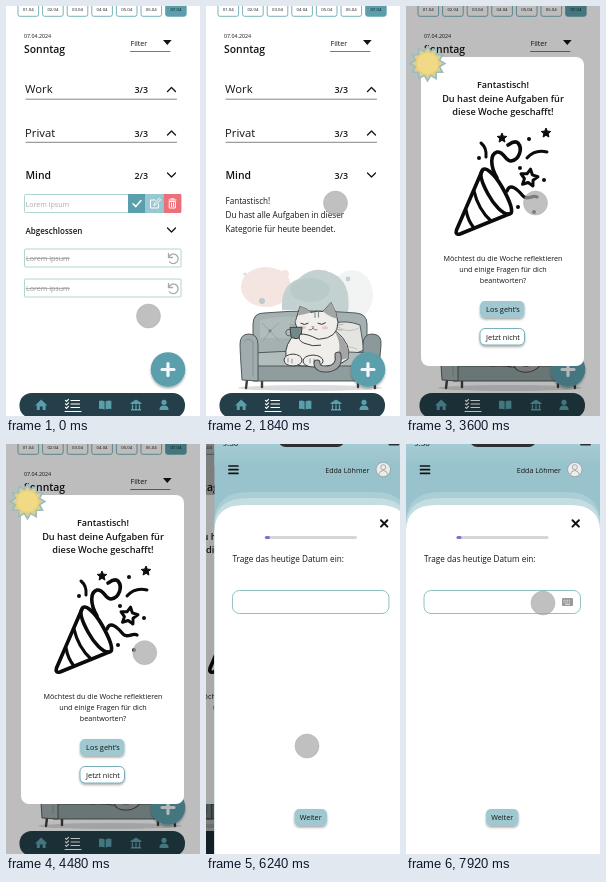
These frames come from a looping animation (194x410 px, 8 s). An HTML page:

```html
<!DOCTYPE html>
<html lang="de">
<head>
<meta charset="utf-8">
<style>
  html, body { margin: 0; width: 100%; height: 100%; overflow: hidden; background: #fff; }
  svg { display: block; width: 194px; height: 410px; }
  text { font-family: "Open Sans", "Noto Sans", sans-serif; white-space: pre; }
</style>
</head>
<body>
<svg id="stage" viewBox="0 0 194 410" xmlns="http://www.w3.org/2000/svg"></svg>
<script>
const LOOP = 8000;
const TEAL = '#5a9fab', PALE = '#9fc8d0', NAVY = '#243f49', INK = '#141414';

// ---- drawing helpers ----
const text = (x, y, size, str, extra = '') =>
  `<text x="${x}" y="${y}" font-size="${size}" fill="${INK}" ${extra}>${str}</text>`;
const bold = (x, y, size, str, extra = '') => text(x, y, size, str, 'font-weight="600" ' + extra);
const mid = (y, size, str, extra = '') => text(97, y, size, str, 'text-anchor="middle" ' + extra);
const rect = (x, y, w, h, r, fill, extra = '') =>
  `<rect x="${x}" y="${y}" width="${w}" height="${h}" rx="${r}" fill="${fill}" ${extra}/>`;
const line = (d, color = INK, w = 1, extra = '') =>
  `<path d="${d}" fill="none" stroke="${color}" stroke-width="${w}" stroke-linecap="round" stroke-linejoin="round" ${extra}/>`;
const shape = (d, fill, extra = '') => `<path d="${d}" fill="${fill}" stroke-linejoin="round" ${extra}/>`;
const dot = (x, y, r, fill, extra = '') => `<circle cx="${x}" cy="${y}" r="${r}" fill="${fill}" ${extra}/>`;
const oval = (x, y, rx, ry, fill, extra = '') =>
  `<ellipse cx="${x}" cy="${y}" rx="${rx}" ry="${ry}" fill="${fill}" ${extra}/>`;
const group = (id, body, extra = '') => `<g id="${id}" ${extra}>${body}</g>`;
const chevron = (y, up) => line(`M161.5 ${y + (up ? 2 : -2)}l4 ${up ? -4 : 4}l4 ${up ? 4 : -4}`, INK, 1.3);

function star(cx, cy, outer, inner, points, turn = -90) {
  let d = '';
  for (let i = 0; i < points * 2; i++) {
    const a = (turn + i * 180 / points) * Math.PI / 180, r = i % 2 ? inner : outer;
    d += `${i ? 'L' : 'M'}${(cx + r * Math.cos(a)).toFixed(2)} ${(cy + r * Math.sin(a)).toFixed(2)}`;
  }
  return d + 'Z';
}

// ---- task page ----
function days() {
  let s = '';
  for (let i = 0; i < 7; i++) {
    const x = 22.3 + i * 24.6, last = i === 6;
    s += rect(x - 10.3, -10, 20.6, 20.3, 2, last ? TEAL : '#fff', `stroke="${TEAL}" stroke-width=".8"`) +
      text(x, 4.6, 4.3, `0${i + 1}.04`, 'text-anchor="middle"');
  }
  return s;
}

function frame() {
  return rect(0, 0, 194, 410, 0, '#fff') + days() +
    text(18, 31.5, 5.3, '07.04.2024') + bold(18, 46.5, 10.4, 'Sonntag') +
    text(124.5, 39.5, 7.1, 'Filter') + shape('M157 34h8.6l-4.3 5z', INK) +
    line('M124.5 45.5H164', '#555', .8) +
    text(19, 87, 11.3, 'Work') + bold(128.5, 86.5, 8.8, '3/3') + chevron(83.5, true) +
    line('M20 93.2H170.5', '#666', .8) +
    text(19, 131, 11.3, 'Privat') + bold(128.5, 130.5, 8.8, '3/3') + chevron(127, true) +
    line('M20 136.3H170.5', '#666', .8) +
    bold(19.5, 173, 10.4, 'Mind') + chevron(169, false);
}

const undo = y => line(`M162.5 ${y - 4.5}v4h4M162.8 ${y - .8}a4.8 4.8 0 1 1 .8 4.6`, '#aaa', 1.3);
const doneRow = y =>
  rect(18.5, y, 156.5, 18, 1, '#fff', 'stroke="#a5d3cf" stroke-width=".9"') +
  text(20, y + 11.8, 7.1, 'Lorem ipsum', 'style="fill:#999"') +
  line(`M20 ${y + 9.5}H63.5`, '#888', .6) + undo(y + 9);

function tasks() {
  return bold(128.5, 172.5, 8.8, '2/3') +
    rect(18.5, 188.5, 156.5, 18, 1, '#fff', 'stroke="#a5d3cf" stroke-width=".9"') +
    text(19.5, 200.5, 7.1, 'Lorem ipsum', 'style="fill:#aaa"') +
    rect(122, 188, 17.6, 19, 0, TEAL) + rect(139.6, 188, 17.8, 19, 0, '#98c8d1') +
    rect(157.4, 188, 17.8, 19, 1, '#ee6f78') +
    line('M127 197.8l2.8 2.8l5.2-6', '#fff', 1.5) +
    line('M149 194h-4.5v8h8v-4M148 199l.5-2l4.8-4.6l1.4 1.4l-4.7 4.7z', '#fff', 1) +
    line('M163 194h7M165 192.8h3M163.6 195.5h5.8v6.5h-5.8zM165.6 197v3.6M167.5 197v3.6', '#fff', 1) +
    bold(19.5, 227.5, 8, 'Abgeschlossen') + chevron(224, false) +
    doneRow(243) + doneRow(273);
}

function sofa() {
  const edge = 'stroke="#454f51" stroke-width=".9"';
  return oval(60, 281, 25, 20, '#f4e5e1') + dot(79, 268, 4, '#f4e5e1') +
    oval(146, 289, 21, 25, '#f2f4f4') +
    shape('M76 304Q74 280 92 273Q108 258 126 267Q146 276 142 306Z', '#c3d1d0') +
    oval(104, 284, 20, 12, '#b4c6c5', 'opacity=".6"') +
    dot(56, 295, 3, '#bccaca') + dot(142, 273, 2.4, '#c3d1d0') + dot(39, 268, 1.6, '#d3dcde') +
    oval(104, 382, 72, 3, '#d9dddd') +
    line('M41 374l-1 8M56 375v6M152 375v6M168 374l1 8', '#4a3d35', 2.4) +
    shape('M47 356V318Q47 307 58 307Q104 303 150 307Q161 308 161 318V356Z', '#a5b1b1', edge) +
    shape('M54 314Q78 308 96 312V332H54Z', '#b6c0bf', 'opacity=".7"') +
    dot(64, 325, 1.4, '#59676a') + dot(148, 322, 1.4, '#59676a') +
    line('M64 325l-8-8M64 325l9-8M64 325l-7 10M64 325l9 10', '#87959a', .6) +
    shape('M123 349L129 317Q141 314 154 319L158 344Q142 352 123 349Z', '#e4e4e0', edge) +
    line('M132 321Q142 328 153 322M130 344Q140 338 151 343', '#a9aaa8', .6) +
    shape('M47 347Q104 343 162 347V361H47Z', '#b2bcbb', edge) +
    shape('M47 360H162V375H47Z', '#8f9d9e', edge) +
    shape('M36 374Q34 345 34 338Q34 328 43 328Q52 328 52 339V375Z', '#a0acad', edge) +
    shape('M157 375V339Q157 328 166 328Q176 328 175 339L172 374Z', '#8c999b', edge) +
    line('M39 335Q43 331 47 336V369', '#78878a', .7);
}

function cat() {
  const edge = 'stroke="#3d3d3f" stroke-width="1"', cream = '#efeeeb', grey = '#a3a5a6';
  const head = shape('M89 316L94 300Q101 302 105 306Q111 304 117 305L125 296Q131 306 132 316Q132 332 113 333Q92 333 89 316Z', cream, edge) +
    shape('M117 305L125 296Q130 304 131 312Q124 311 117 305Z', grey) +
    shape('M94 300Q101 302 105 306Q98 308 92 309Z', grey) +
    line('M109 306v5M112.5 305.5v5', '#85888a', 1.1) +
    line('M95 317q3.5 2.5 7 0M112 317q4 2.5 7.5-.5', '#333', 1) +
    shape('M105 320h4l-2 2z', '#c98a86') +
    line('M107 322q-1 2.5-4 1.5M107 322q1 2.5 4 1.5', '#444', .7) +
    oval(97, 321, 3, 1.7, '#e8c9c3') + oval(119, 321.5, 3, 1.7, '#e8c9c3') +
    line('M89 319l-5-1M90 322l-5 1M131 319l6-1M130 323l6 1', '#777', .5);
  const tail = 'M132 349Q134 361 122 363Q111 364 111 357';
  return shape('M80 351Q78 338 90 327Q110 316 130 325Q146 338 142 353Q132 362 105 360Q83 361 80 351Z', cream, edge) +
    shape('M128 324Q145 338 142 352Q136 355 131 352Q137 339 128 324Z', grey) +
    oval(87, 354, 9, 6, cream, edge) + oval(107, 355, 10, 6, cream, edge) +
    line('M82 352v4M86 353v4M104 353v4M108 353v4', '#555', .6) +
    line(tail, '#44484a', 7) + line(tail, grey, 5) +
    group('head', head) +
    line('M86 316q-2-3 0-5M90 316q-2-3 0-5', '#aaa', .6) +
    shape('M84 321H96L95 331Q90 334 85 331Z', '#71898b', edge) + line('M84 323q-5 0-4 4t5 2', '#4e5d60', 1) +
    shape('M112 333Q101 327 94 328Q91 334 98 337Q107 341 115 339', cream, edge);
}

function praise() {
  return bold(128.5, 172.5, 8.8, '3/3') +
    text(19.5, 198, 8.1, 'Fantastisch!') +
    text(19.5, 212, 8.2, 'Du hast alle Aufgaben in dieser') +
    text(19.5, 225.5, 8.2, 'Kategorie für heute beendet.') +
    sofa() + group('cat', cat());
}

function nav() {
  return dot(162, 363.5, 17.3, TEAL, 'filter="url(#soft)"') +
    line('M162 357.5v12M156 363.5h12', '#f1f8f9', 3.2) +
    rect(13.5, 387, 165.5, 25, 12, NAVY) +
    shape('M29 399.5l6.2-6l6.2 6h-1.8v4.5h-3v-3.5h-2.8v3.5h-3v-4.5z', TEAL) +
    line('M65 394.5h8.5M65 398h8.5M65 401.5h8.5M59.5 394.3l1 1l2-2M59.5 397.8l1 1l2-2M59.5 401.3l1 1l2-2', '#fff', 1.2) +
    line('M59 405.5H75', '#fff', 1) +
    shape('M93 395q3-1 5.6.5v8q-3-1-5.6-.5zM99.6 395.5q3-1.5 5.8-.5v8q-3-.5-5.8.5z', TEAL) +
    shape('M124.5 397l5.5-3.5l5.5 3.5v1h-11zM125 403h10v1.4h-10z', TEAL) +
    line('M126.5 399v3.5M130 399v3.5M133.5 399v3.5', TEAL, 1.3) +
    dot(158, 396.3, 2.6, TEAL) + shape('M153.4 404q0-4.4 4.6-4.4t4.6 4.4z', TEAL);
}

// ---- dialog ----
function popper() {
  const pen = (d, w = 3.6) => line(d, '#0b0b0b', w);
  return pen('M76 165L50.5 224Q49 229 54 228L103 208') +
    pen('M76 165C78 159 88 167 96 181C104 195 109 208 103 208C97 209 88 199 82 188C76 177 73 169 76 165Z') +
    pen('M68 185Q72 203 85 215M60 204Q62 215 68 222', 3.2) +
    pen('M91 172C84 160 84 148 91 146C98 145 99 155 105 155C113 154 117 143 112 137C109 134 105 137 102 139') +
    pen('M101 185C104 176 112 184 117 190C121 195 127 188 131 191', 3.4) +
    pen('M121 152Q129 143 141 146M75 137Q81 142 80 151', 3) +
    shape(star(96, 132, 5, 2.3, 5), '#0b0b0b', 'stroke="#0b0b0b" stroke-width="1"') +
    shape(star(140, 127, 5, 2.3, 5), '#0b0b0b', 'stroke="#0b0b0b" stroke-width="1"') +
    shape(star(123, 172, 9, 4.6, 5, -80), '#fff', 'stroke="#0b0b0b" stroke-width="3"') +
    [[123, 133], [73, 152], [114, 162], [138, 174], [128, 206], [112, 201]]
      .map(p => dot(p[0], p[1], 2, '#0b0b0b')).join('');
}

const sunShape = (rim, fill, core) =>
  shape(star(0, 0, 19, 13.5, 12), rim) + shape(star(0, 0, 15.5, 11.5, 12), fill) + dot(0, 0, 10.5, core);

function dialog() {
  return rect(0, 0, 194, 410, 0, '#000', 'opacity=".26"') +
    rect(15, 51, 163, 309, 8, '#fff') +
    mid(82, 9, 'Fantastisch!', 'font-weight="600"') +
    mid(95.5, 9.2, 'Du hast deine Aufgaben für', 'font-weight="600"') +
    mid(109, 9.2, 'diese Woche geschafft!', 'font-weight="600"') + popper() +
    mid(255, 7.2, 'Möchtest du die Woche reflektieren') +
    mid(266, 7.2, 'und einige Fragen für dich') + mid(277, 7.2, 'beantworten?') +
    rect(74, 295, 44.5, 17, 5, PALE, 'filter="url(#soft)"') + mid(306, 7.4, 'Los geht’s') +
    rect(74, 322.5, 44.5, 16.5, 5, '#fff', `stroke="${TEAL}" stroke-width=".8" filter="url(#soft)"`) +
    mid(333.5, 7.4, 'Jetzt nicht') +
    group('sun', group('sunPale', sunShape('#9bbcc0', '#e5cf83', '#f0da86')) +
      group('sunFull', sunShape('#4f97a5', '#fbc53a', '#fdc52f')));
}

// ---- question page ----
function question() {
  return rect(0, 0, 194, 410, 0, '#98c3cc') + rect(0, 0, 194, 22, 0, 'url(#sky)') +
    text(8, 2, 8, '9:30') + rect(63.5, -14, 67, 17, 8, '#2c2f31') + rect(174, -4, 11, 5.5, 1.5, '#2c2f31') +
    line('M14.5 22h9M14.5 25.7h9M14.5 29.4h9', INK, 1.7) +
    text(155, 28.5, 7.1, 'Edda Löhmer', 'text-anchor="end"') +
    dot(168.8, 25.5, 7.2, '#ececec', 'stroke="#888" stroke-width=".6"') +
    dot(168.8, 23.2, 2.5, 'none', 'stroke="#999" stroke-width=".8"') +
    line('M164.5 30q.5-3.5 4.3-3.5t4.3 3.5', '#999', .8) +
    shape('M0 73Q4 48 34 48H160Q190 48 194 73V410H0Z', '#a9ced6') +
    shape('M0 78Q3 54 34 54H160Q191 54 194 78V410H0Z', '#c3dde2') +
    shape('M0 86Q1 61 30 61H164Q193 61 194 86V410H0Z', '#fff') +
    line('M166.5 76.2l6.4 6.4M172.9 76.2l-6.4 6.4', INK, 2) +
    rect(50.5, 92, 92, 3, 1.5, '#d5d5da') + rect(50.5, 92, 5, 3, 1.5, '#7a72cf') +
    text(18, 118, 8.2, 'Trage das heutige Datum ein:') +
    rect(18, 146.5, 156.5, 23, 7, '#fff', 'stroke="#74b0b0" stroke-width=".8"') +
    group('keys', rect(156, 154, 11, 8, 1, '#999') +
      line('M158 156.3h7M158 158.2h7', '#fff', .9, 'stroke-dasharray=".1 1.7"') + line('M159.5 160.3h4', '#fff', .8)) +
    rect(80, 365, 32.5, 17, 5, PALE, 'filter="url(#soft)"') +
    text(96.2, 376, 7.2, 'Weiter', 'text-anchor="middle"');
}

const stage = document.getElementById('stage');
stage.innerHTML = `<defs>
  <filter id="soft" x="-30%" y="-30%" width="160%" height="180%"><feDropShadow dx="0" dy="1.5" stdDeviation="1.2" flood-opacity=".35"/></filter>
  <linearGradient id="sky" x2="0" y2="1"><stop stop-color="#a5cbd3"/><stop offset="1" stop-color="#98c3cc"/></linearGradient>
  </defs>` +
  group('home', frame() + group('tasks', tasks()) + group('praise', praise()) + nav() + group('dialog', dialog())) +
  group('shade', rect(0, 0, 194, 410, 0, '#000')) +
  group('question', question()) +
  group('touch', dot(0, 0, 12, '#a9a9a9', 'opacity=".72" stroke="#8c8c8c" stroke-width=".5"'));

// ---- motion ----
const el = {};
for (const g of stage.querySelectorAll('g[id]')) el[g.id] = g;

const ramp = (t, a, b) => Math.min(1, Math.max(0, (t - a) / (b - a)));
const smooth = p => p * p * (3 - 2 * p);
const outQuart = p => 1 - (1 - p) ** 4;
const fade = (g, v) => {
  g.setAttribute('opacity', v.toFixed(3));
  g.setAttribute('display', v > 0 ? 'inline' : 'none');
};
const place = (g, v) => g.setAttribute('transform', v);

// start, end, from, bend, to
const moves = [
  [0, 900, [142.5, 310], [146, 240], [129.5, 197]],
  [4260, 5160, [129.5, 197], [168, 233], [101, 302]],
  [6800, 7600, [101, 302], [112, 215], [137, 159]]
];
const taps = [1160, 5560, 7780];

function pointer(t) {
  let [x, y] = moves[0][2];
  for (const [a, b, p, q, r] of moves) {
    if (t < a) break;
    const k = smooth(ramp(t, a, b)), m = 1 - k;
    [x, y] = [0, 1].map(i => m * m * p[i] + 2 * m * k * q[i] + k * k * r[i]);
  }
  return [x, y];
}

function draw(t) {
  const [x, y] = pointer(t);
  const press = Math.max(...taps.map(c => 1 - Math.min(1, Math.abs(t - c) / 130)));
  place(el.touch, `translate(${x.toFixed(2)} ${y.toFixed(2)}) scale(${(1 - .12 * smooth(press)).toFixed(3)})`);

  const done = smooth(ramp(t, 1460, 1760));
  fade(el.tasks, 1 - done);
  fade(el.praise, done);

  // the cat nods while it breathes
  const breath = Math.sin((t - 2520) / 2720 * 2 * Math.PI);
  place(el.cat, `translate(0 360) scale(1 ${(1 + .008 * breath).toFixed(4)}) translate(0 -360)`);
  place(el.head, `translate(${(-1.5 - 1.5 * breath).toFixed(2)} ${(-1 - breath).toFixed(2)})`);

  fade(el.dialog, smooth(ramp(t, 3200, 3560)));
  const glow = smooth(ramp(t, 4560, 5040));
  place(el.sun, `translate(${21.5 - 2 * glow} 57.5) rotate(${(15 * glow).toFixed(2)})`);
  fade(el.sunFull, glow);

  const push = outQuart(ramp(t, 5850, 6570));
  place(el.home, `translate(${(-48.5 * push).toFixed(2)} 0)`);
  place(el.question, `translate(${(194 * (1 - push)).toFixed(2)} 0)`);
  fade(el.shade, .35 * push);
  fade(el.keys, ramp(t, 7400, 7480));
}

function tick() {
  draw(performance.now() % LOOP);
  requestAnimationFrame(tick);
}
tick();
</script>
</body>
</html>
```
